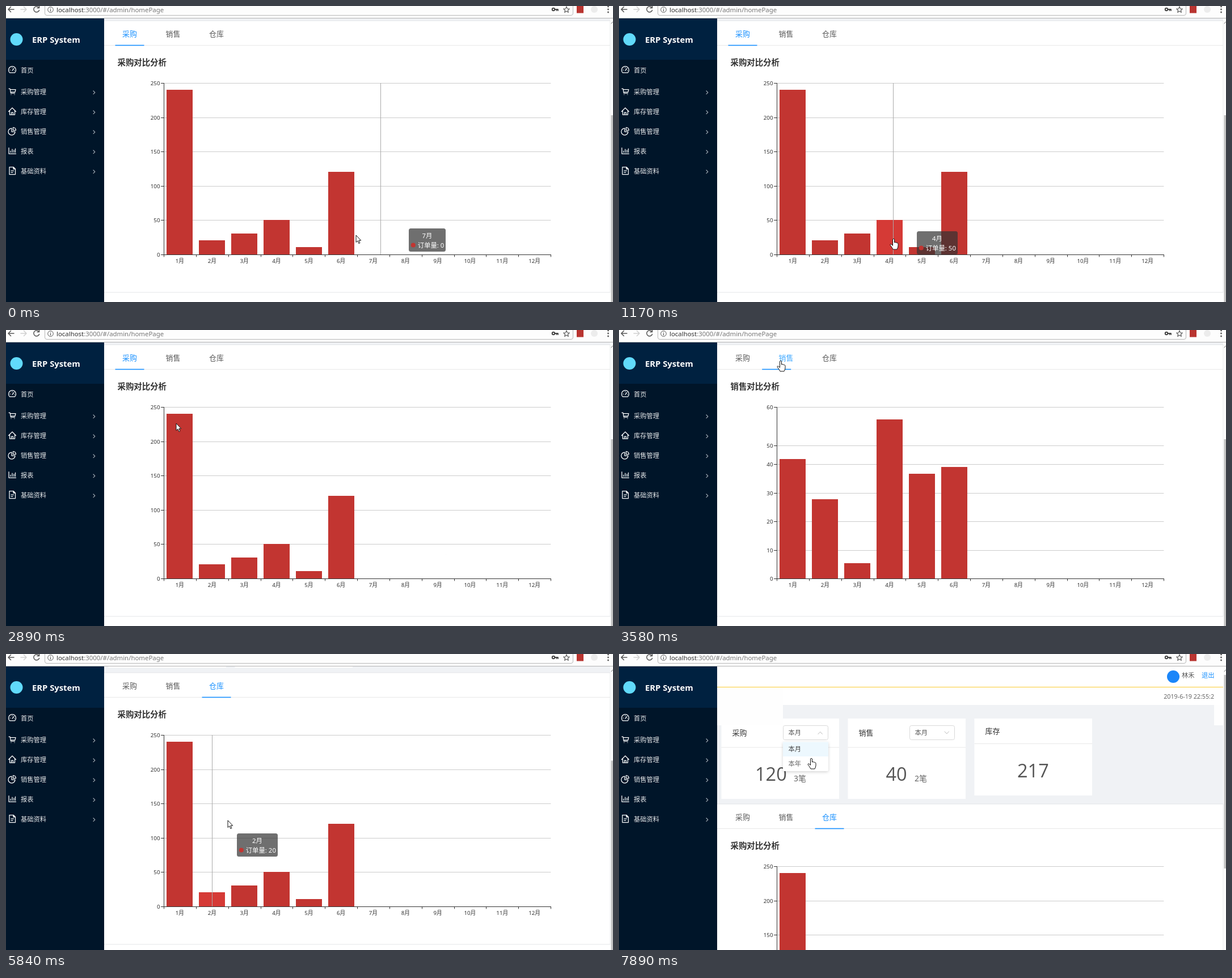
These frames come from a looping animation (1070x523 px, 8 s). An HTML page:

```html
<!DOCTYPE html>
<html lang="zh-CN">
<head>
<meta charset="utf-8">
<title>ERP System</title>
<style>
html, body { margin: 0; width: 100%; height: 100%; overflow: hidden; background: #fff; }
svg { display: block; width: 1070px; height: 523px; }
text { font-family: "Noto Sans", "Noto Sans CJK SC", "Noto Sans CJK", sans-serif; white-space: pre; }
.big { font-family: "Open Sans", "Noto Sans", sans-serif; }
.line { fill: none; stroke-linecap: round; stroke-linejoin: round; }
</style>
</head>
<body>
<svg id="stage" viewBox="0 0 1070 523">
  <defs>
    <clipPath id="view"><rect x="173" y="22" width="897" height="501"/></clipPath>
    <filter id="shadow" x="-20%" y="-20%" width="140%" height="150%">
      <feDropShadow dx="0" dy="1.5" stdDeviation="2.5" flood-opacity=".18"/>
    </filter>
  </defs>
  <g clip-path="url(#view)"><g id="page"></g><g id="fixed"></g></g>
  <g id="side"></g>
  <g id="browser"></g>
  <g id="cursor" stroke="#111" stroke-width="1" stroke-linejoin="round" fill="#fff">
    <path id="arrow" d="M0 0V12.5L2.9 9.9 4.9 14.6 6.9 13.7 4.9 9.2H8.7Z"/>
    <path id="hand" d="M-1.5 1.2Q0-.6 1.5 1.2V7Q3 5.6 4.3 7.2Q6 6.4 6.6 8Q8 7.6 8 9.5V13Q7.8 16 6 19H-1Q-3 15-5.8 11.6Q-6.4 9.6-4.4 9.8L-1.5 12.3Z"/>
  </g>
</svg>
<script>
const $ = id => document.getElementById(id);
const NS = 'http://www.w3.org/2000/svg';
const set = (el, attrs) => { for (const k in attrs) el.setAttribute(k, attrs[k]); return el; };
const add = (parent, tag, attrs) => parent.appendChild(set(document.createElementNS(NS, tag), attrs || {}));
const rect = (p, x, y, width, height, fill, more) => add(p, 'rect', { x, y, width, height, fill, ...more });
const path = (p, d, stroke, w = 1, more) => add(p, 'path', { d, stroke, 'stroke-width': w, class: 'line', ...more });
const circle = (p, cx, cy, r, fill, more) => add(p, 'circle', { cx, cy, r, fill, ...more });
// y is the vertical middle of the line
const text = (p, str, x, y, size, fill, more) => {
  const el = add(p, 'text', { x, y: y + size * .37, 'font-size': size, fill, ...more });
  el.textContent = str;
  return el;
};
const show = (el, on) => el.setAttribute('display', on ? 'inline' : 'none');
const weight = w => ({ 'font-weight': w });
const END = { 'text-anchor': 'end' }, MID = { 'text-anchor': 'middle' };

const LOOP = 8000, SCROLL = 239;
const LEFT = 278, RIGHT = 960, TOP = 136.5, BASE = 439.5, STEP = (RIGHT - LEFT) / 12, BAR_W = 46;
const RED = '#c23531', RED_LIT = '#d53a36', BLUE = '#1890ff', BLUE_LIT = '#40a9ff';
const SETS = [
  { max: 250, gap: 50, data: [240, 20, 30, 50, 10, 120] },
  { max: 60, gap: 10, data: [40, 30, 5, 60, 40, 40] }
];
const barX = i => Math.round(LEFT + STEP * (i + .095));
const valueY = (v, max) => BASE - (BASE - TOP) * v / max;
// centre of the pixel row or column that holds v
const crisp = v => Math.round(v - .5) + .5;

// ---------- browser bar ----------
{
  const b = $('browser');
  rect(b, 0, 0, 1070, 22, '#fdfdfd');
  rect(b, 0, 21, 1070, 1, '#b4b4b4');
  path(b, 'M68.5-2V13Q68.5 16.5 72 16.5H996Q999.5 16.5 999.5 13V-2', '#b8b8b8');
  path(b, 'M14 6H4M8.5 1.5L4 6L8.5 10.5', '#555', 1.5);
  path(b, 'M26 6H36M31.5 1.5L36 6L31.5 10.5', '#d0d0d0', 1.5);
  path(b, 'M58 3A5 5 0 1 0 58.6 7.5M58.6 0V3.6H55', '#555', 1.5);
  circle(b, 78.5, 6.5, 4.8, 'none', { stroke: '#555' });
  path(b, 'M78.5 6V9M78.5 4V4.1', '#555', 1.2);
  text(b, 'localhost', 89, 6.3, 11.4, '#333');
  text(b, ':3000/#/admin/homePage', 137.2, 6.3, 11.4, '#777');
  circle(b, 965, 6, 2.2, 'none', { stroke: '#444', 'stroke-width': 2 });
  path(b, 'M967.5 6H973V8M970.5 6V8', '#444', 1.8);
  path(b, 'M988 1L989.5 4.8L993.3 5L990.4 7.5L991.4 11.3L988 9.2L984.6 11.3L985.6 7.5L982.7 5L986.5 4.8Z', '#555', 1.1);
  rect(b, 1006, 0, 12, 12.5, '#b93430');
  circle(b, 1037, 6, 6, '#ececec');
  [1, 6, 11].forEach(y => circle(b, 1061.5, y, 1.4, '#555'));
}

// ---------- sidebar ----------
{
  const s = $('side');
  rect(s, 0, 22, 173, 501, '#001529');
  rect(s, 0, 22, 173, 73, '#002140');
  circle(s, 18.5, 59, 11, '#61dafb');
  text(s, 'ERP System', 46, 60, 14.8, '#fff', weight(700));
  const items = [
    ['首页', 113, 'M-4.5 4.8A6.5 6.5 0 1 1 4.5 4.8ZM0 1L3-2.5M-4 0H-3.5M0-4V-3.6M4 1H4.2'],
    ['采购管理', 151, 'M-6-5H-4L-2.5 3H4.5M-3.7-3.3H6L5 1H-3M-2 5.5V5.6M4 5.5V5.6'],
    ['库存管理', 186, 'M-6.5 .5L0-6L6.5.5M-4.5-1V6H4.5V-1M-1.5 6V2H1.5V6'],
    ['销售管理', 221, 'M-1-5A6 6 0 1 0 5 1H-1ZM1.5-6.5A5.5 5.5 0 0 1 6.5-1.5H1.5Z'],
    ['报表', 256, 'M-6-5.5V5H6.5M-3 2.5V0M0 2.5V-3M3 2.5V-1.5M5.5 2.5V-4'],
    ['基础资料', 291, 'M-5-6.5H2L5.5-3V6.5H-5ZM2-6.5V-3H5.5M-2 0H2.5M-2 3H1']
  ];
  items.forEach(([name, y, d], i) => {
    path(s, d, '#fff', 1.25, { transform: `translate(11 ${y})` });
    text(s, name, 26, y + 1, 11.25, '#e6e8ea');
    if (i) path(s, `M154 ${y - 1}l2.8 2.8l-2.8 2.8`, '#a3adb6', 1.2);
  });
}

// ---------- page, in coordinates of the unscrolled state ----------
const page = $('page');
rect(page, 173, -217, 897, 740, '#fff');
rect(page, 173, -149, 892, 175, '#f0f2f5');
rect(page, 173, -181, 892, 1, '#fbcb30');
circle(page, 977, -199, 11, '#1b86f9');
text(page, '林禾', 992, -201, 11.3, '#555');
text(page, '退出', 1027, -201, 11.3, BLUE);
const clock = text(page, '', 1049, -164, 10.7, '#666', END);

function card(x, y, h, rule, name, num, numX, count, countX) {
  const mid = rule + 48;
  rect(page, x, y, 207.5, h, '#fff');
  rect(page, x, rule, 207.5, 1, '#e8e8e8');
  text(page, name, x + 19, (y + rule) / 2, 13, '#333');
  text(page, num, numX, mid - .5, 32.5, '#555', { class: 'big' });
  if (count) text(page, count, countX, mid + 7, 14, '#666');
}
function select(x) {
  const box = rect(page, x, -112.5, 79, 25, '#fff', { rx: 3, stroke: '#d9d9d9' });
  text(page, '本月', x + 9, -100, 11.3, '#555');
  const chev = path(page, '', '#bbb');
  return { box, turn: up => chev.setAttribute('d', `M${x + 61.5} ${up ? -97.5 : -102}l3.7 ${up ? -4 : 4}l3.7 ${up ? 4 : -4}`) };
}
card(180.5, -125, 142, -74.5, '采购', '120', 240, '3笔', 308);
card(403.5, -125, 142, -74.5, '销售', '40', 470.5, '2笔', 521);
card(626.5, -125, 136, -81, '库存', '217', 702, '');
const monthSelect = select(289.5);
select(512.5).turn(false);

rect(page, 172.5, 26, 892.5, 480, '#fff', { stroke: '#e4e6e8' });
rect(page, 173, 69, 892, 1, '#e8e8e8');
const tabs = ['采购', '销售', '仓库'].map((s, i) => text(page, s, 205 + 76.5 * i, 49, 12.9, '#595959'));
const ink = rect(page, 0, 68.7, 51, 1.6, BLUE);
const title = text(page, '', 196.5, 100, 14.4, '#333', weight(700));

const ticks = Array.from({ length: 7 }, () => {
  const g = add(page, 'g');
  path(g, `M${LEFT} 0H${RIGHT}`, '#ccc');
  path(g, `M273.5 0H${LEFT}`, '#333');
  return { g, label: text(g, '', 271.5, 0, 9.8, '#333', END) };
});
const bars = SETS[0].data.map((_, i) => rect(page, barX(i), 0, BAR_W, 0, RED));
path(page, `M278.5 ${TOP}V${BASE}H${RIGHT}`, '#333');
for (let i = 0; i <= 12; i++) {
  path(page, `M${crisp(LEFT + .5 + STEP * i)} ${BASE}v3.5`, '#333');
  if (i < 12) text(page, i + 1 + '月', LEFT + STEP * (i + .5), 450, 9.7, '#333', MID);
}
const pointer = path(page, `M0 ${TOP}V${BASE - 1}`, '#aaa');

const tip = add(page, 'g');
const tipBox = rect(tip, 0, 0, 65, 41, 'rgba(50,50,50,.7)', { rx: 3.5 });
const tipHead = text(tip, '', 0, 13, 11.4, '#fff', { ...MID, ...weight(500) });
circle(tip, 7.8, 29.5, 4, RED);
const tipRow = text(tip, '', 15.7, 29.5, 11.4, '#fff', weight(500));

// ---------- parts that do not scroll ----------
const fixed = $('fixed');
const veil = ['M173 60H1065V69H960V82H1065V126H173Z', 'M173 60H289V126H173ZM1049 90H1065V126H1049Z']
  .map(d => add(fixed, 'path', { d, fill: '#fefefe' }));
rect(fixed, 1065.5, 22, 5, 501, '#fbfbfb');
path(fixed, 'M1067 31l2.5-3', '#777');
const thumb = rect(fixed, 1066.5, 193, 4, 342, '#c1c1c1');
const menu = add(fixed, 'g');
rect(menu, 289, 155, 80, 52, '#fff', { rx: 3, filter: 'url(#shadow)' });
rect(menu, 289, 155.5, 80, 25.5, '#edf8fe');
text(menu, '本月', 298.5, 168, 11.3, '#444', weight(500));
text(menu, '本年', 298.5, 194, 11.3, '#666');

// ---------- motion ----------
const CURSOR = [
  [-300, 710, 371], [0, 617, 405], [150, 606, 409], [400, 575, 413], [700, 537, 394], [900, 512, 380],
  [1170, 484, 411], [1320, 470, 408], [1600, 400, 380], [1900, 322, 338], [2200, 322, 338],
  [2430, 312, 290], [2700, 304, 190], [2950, 290, 90], [3150, 285, 54], [4000, 285, 54], [4450, 373, 56],
  [4740, 378, 54], [5150, 378, 54], [5300, 382, 130], [5560, 391, 294], [5950, 391, 294],
  [6450, 360, 200], [6800, 332, 141], [7070, 341, 146], [7340, 341, 146], [7890, 339, 184]
];
const SCROLLING = [[5720, 0], [5840, 7], [6000, 60], [6250, 150], [6520, 230], [6664, SCROLL]];
const RUNS = [[150, 1170, 9], [1320, 2300, 8], [2430, 3430, 7], [3580, 4590, 7],
  [4740, 5720, 8], [5840, 6800, 8], [6950, 7070, 2], [7340, 7890, 4]];
const TIMES = [0, ...RUNS.flatMap(([a, b, n]) => Array.from({ length: n }, (_, i) => a + (b - a) * i / (n - 1)))];

const clamp = v => Math.max(0, Math.min(1, v));
const lerp = (a, b, p) => a + (b - a) * p;
function along(keys, t) {
  const i = keys.findIndex(k => k[0] > t);
  if (i < 0) return keys[keys.length - 1].slice(1);
  if (!i) return keys[0].slice(1);
  const a = keys[i - 1], b = keys[i], p = (t - a[0]) / (b[0] - a[0]);
  return a.slice(1).map((v, k) => lerp(v, b[k + 1], p));
}
const cubicOut = p => 1 - (1 - p) ** 3;
const cubicInOut = p => p < .5 ? 4 * p ** 3 : 1 - (2 - 2 * p) ** 3 / 2;
const category = t => Math.max(0, Math.min(11, Math.floor((along(CURSOR, t)[0] - LEFT) / STEP)));

function drawChart(t, lit) {
  const now = t >= 3415 && t < 4870 ? 1 : 0;
  const start = t >= 4870 ? 4870 : t >= 3415 ? 3415 : -LOOP;
  const p = cubicOut(clamp((t - start) / 300));
  const to = SETS[now], from = SETS[1 - now];
  ticks.forEach(({ g, label }, i) => {
    const v = i * to.gap, y = valueY(v, to.max);
    show(g, v <= to.max);
    // the tick both scales share slides, the others jump
    const at = v === 50 ? lerp(valueY(v, from.max), y, p) : y;
    g.setAttribute('transform', `translate(0 ${crisp(at)})`);
    label.textContent = v;
  });
  bars.forEach((bar, i) => {
    const y = Math.round(lerp(valueY(from.data[i], from.max), valueY(to.data[i], to.max), p) - 1);
    set(bar, { y, height: BASE - y, fill: i === lit ? RED_LIT : RED });
  });
}

function drawTip(t, on, cat) {
  show(tip, on);
  show(pointer, on);
  if (!on) return;
  // the second hover begins where the cursor enters the chart
  const past = lag => t > 5000 ? Math.max(t - lag, 5450) : t - lag;
  let x = 0;
  for (let k = 0; k < 9; k++) x += LEFT + STEP * (category(past(60 + 20 * k)) + .5);
  pointer.setAttribute('transform', `translate(${crisp(x / 9)} 0)`);
  const [cx, cy] = along(CURSOR, past(250));
  tip.setAttribute('transform', `translate(${Math.round(cx + 15.5)} ${Math.round(cy + 16)})`);
  const value = String(SETS[0].data[cat] || 0), width = 58 + 7 * value.length;
  tipBox.setAttribute('width', width);
  tipHead.setAttribute('x', width / 2);
  tipHead.textContent = cat + 1 + '月';
  tipRow.textContent = '订单量: ' + value;
}

function draw(t) {
  const [x, y] = along(CURSOR, t), [scroll] = along(SCROLLING, t);
  const tab = t < 3394 ? 0 : t < 4834 ? 1 : 2;
  const tipOn = t < 2750 || (t >= 5450 && t < 5960);
  const cat = category(t - 60);

  page.setAttribute('transform', `translate(0 ${Math.round(scroll)})`);
  thumb.setAttribute('y', 193 - .653 * scroll);
  drawChart(t, tipOn ? cat : -1);
  drawTip(t, tipOn, cat);

  const onTabs = y < 68 && t < 5300;
  tabs.forEach((el, i) => {
    const over = onTabs && x > 193 + 76.5 * i && x < 244 + 76.5 * i;
    el.setAttribute('fill', over ? BLUE_LIT : i === tab ? BLUE : '#595959');
  });
  const slide = cubicInOut(clamp((t - 3394) / 300)) + cubicInOut(clamp((t - 4834) / 300));
  ink.setAttribute('x', 192.5 + 76.5 * slide);
  title.textContent = (tab === 1 ? '销售' : '采购') + '对比分析';

  const open = t >= 7340;
  clock.textContent = '2019-6-19 22:55:' + (open ? 2 : t >= 6340 ? 1 : 0);
  show(veil[0], scroll === SCROLL && !open);
  show(veil[1], open);
  show(menu, open);
  monthSelect.turn(open);
  monthSelect.box.setAttribute('stroke', t >= 6950 && t < 7520 ? BLUE_LIT : '#d9d9d9');

  const bar = Math.floor((x - LEFT) / STEP), data = SETS[0].data;
  const onBar = t < 2750 && bar < 6 && x > barX(bar) && x < barX(bar) + BAR_W && y > valueY(data[bar], 250);
  const hand = onBar || onTabs || t >= 6700;
  show($('hand'), hand);
  show($('arrow'), !hand);
  $('cursor').setAttribute('transform', `translate(${Math.round(x)} ${Math.round(y)})`);
}

function tick() {
  const t = performance.now() % LOOP;
  draw(TIMES.filter(v => v <= t + 12).pop());
  requestAnimationFrame(tick);
}
tick();
</script>
</body>
</html>
```
